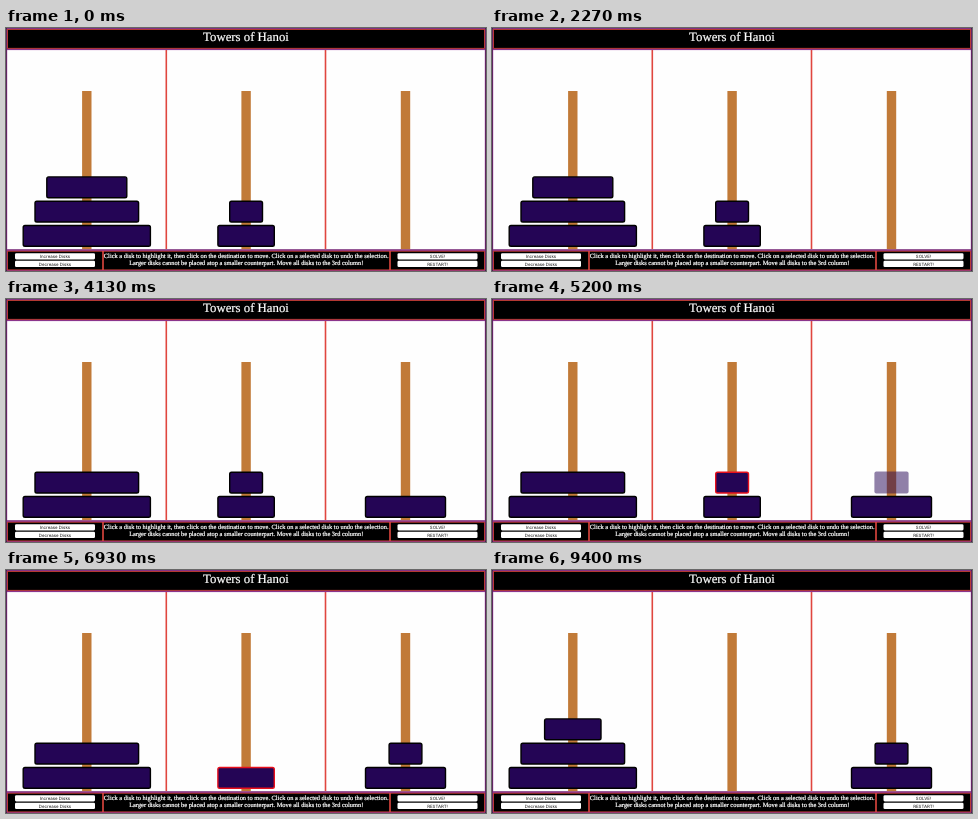
An HTML page for the animation above (9.59 s loop, 480 px wide and 243 px high).

```html
<!DOCTYPE html>
<html lang="en">
<head>
<meta charset="utf-8">
<title>Towers of Hanoi</title>
<style>
  html, body { margin: 0; width: 100%; height: 100%; overflow: hidden; background: #000; }
  svg { display: block; width: 100vw; height: 100vh; }
  text { text-anchor: middle; fill: #fff; stroke: #fff; stroke-width: .22; font-family: "Liberation Serif", Times, serif; text-rendering: geometricPrecision; }
  .label { fill: #111; stroke: none; font: 4.4px Inter, "Liberation Sans", sans-serif; }
</style>
</head>
<body>
<svg id="stage" viewBox="0 0 480 243"></svg>
<script>
const LOOP = 9590;
const PURPLE = '#a33fa5', RED = '#e0463f';
const CENTERS = [80.8, 240.1, 399.5];
const START = [[5, 4, 3], [2, 1], []];
const MOVES = [
  { from: 0, to: 2, select: 2400, hover: 2730, drop: 3530 },
  { from: 1, to: 2, select: 4870, hover: 5130, drop: 5530 },
  { from: 1, to: 0, select: 6870, hover: 7330, drop: 7730 }
];
const stage = document.getElementById('stage');

function add(tag, attrs, content = '') {
  const node = document.createElementNS('http://www.w3.org/2000/svg', tag);
  for (const key in attrs) node.setAttribute(key, attrs[key]);
  node.textContent = content;
  return stage.appendChild(node);
}

function box(x, y, width, height, fill, more = {}) {
  return add('rect', { x, y, width, height, fill, ...more });
}

function frame(left, top, right, bottom, color) {
  box(left + 0.4, top + 0.4, right - left - 0.8, bottom - top - 0.8, 'none',
    { stroke: color, 'stroke-width': 0.8 });
}

function button(x, y, label) {
  box(x, y, 80, 6.2, '#fff', { rx: 1.3 });
  add('text', { x: x + 40, y: y + 4.7, class: 'label' }, label);
}

function drawScene() {
  box(0, 0, 480, 243, '#000');
  box(1, 22, 478, 199.5, '#fefefe');
  CENTERS.forEach(x => box(x - 4.7, 63, 9.4, 158.5, '#c17a38'));
  [160.3, 319.5].forEach(x => box(x - 0.8, 22, 1.6, 199, RED));

  // Each row has a purple frame; header and footer cells add a red one inside.
  [[0.2, 21.5], [21.3, 222.2], [222, 243]].forEach(([top, bottom]) => frame(0.4, top, 479.6, bottom, PURPLE));
  frame(1.2, 1, 478.8, 20.7, RED);
  [[1.2, 97], [97, 384], [384, 478.8]].forEach(([left, right]) => frame(left, 222.8, right, 242.3, RED));

  add('text', { x: 240, y: 13.2, 'font-size': 12.8 }, 'Towers of Hanoi');
  const help = [
    'Click a disk to highlight it, then click on the destination to move. Click on a selected disk to undo the selection.',
    'Larger disks cannot be placed atop a smaller counterpart. Move all disks to the 3rd column!'
  ];
  help.forEach((line, i) => add('text', { x: 240.2, y: 229.9 + i * 7.4, 'font-size': 6.4 }, line));

  button(9, 225.2, 'Increase Disks');
  button(9, 232.8, 'Decrease Disks');
  button(391.5, 225.2, 'SOLVE!');
  button(391.5, 232.8, 'RESTART!');
}

const diskWidth = size => 10.6 + 23.6 * size;

function makeDisk(size) {
  return box(0, 0, diskWidth(size) - 1.4, 20.8, '#240555', { rx: 1.8, 'stroke-width': 1.4 });
}

function place(node, size, column, level) {
  node.setAttribute('x', CENTERS[column] - diskWidth(size) / 2 + 0.7);
  node.setAttribute('y', 197.5 - level * 24.3);
}

drawScene();
const disks = [1, 2, 3, 4, 5].map(makeDisk);
const ghost = box(0, 0, 0, 22, '#240555', { rx: 2, opacity: 0.5 });

function render(t) {
  const towers = START.map(tower => [...tower]);
  let selected = 0, hint = null;
  for (const { from, to, select, hover, drop } of MOVES) {
    if (t >= drop) {
      towers[to].push(towers[from].pop());
    } else if (t >= select) {
      selected = towers[from].at(-1);
      if (t >= hover) hint = to;
    }
  }

  towers.forEach((tower, column) => tower.forEach((size, level) => {
    const disk = disks[size - 1];
    place(disk, size, column, level);
    disk.setAttribute('stroke', size === selected ? '#e8101c' : '#000');
  }));

  ghost.setAttribute('visibility', hint === null ? 'hidden' : 'visible');
  if (hint !== null) {
    ghost.setAttribute('width', diskWidth(selected));
    ghost.setAttribute('x', CENTERS[hint] - diskWidth(selected) / 2);
    ghost.setAttribute('y', 196.9 - towers[hint].length * 24.3);
  }
}

const begin = performance.now();
function tick() {
  render((performance.now() - begin) % LOOP);
  requestAnimationFrame(tick);
}
tick();
</script>
</body>
</html>
```
